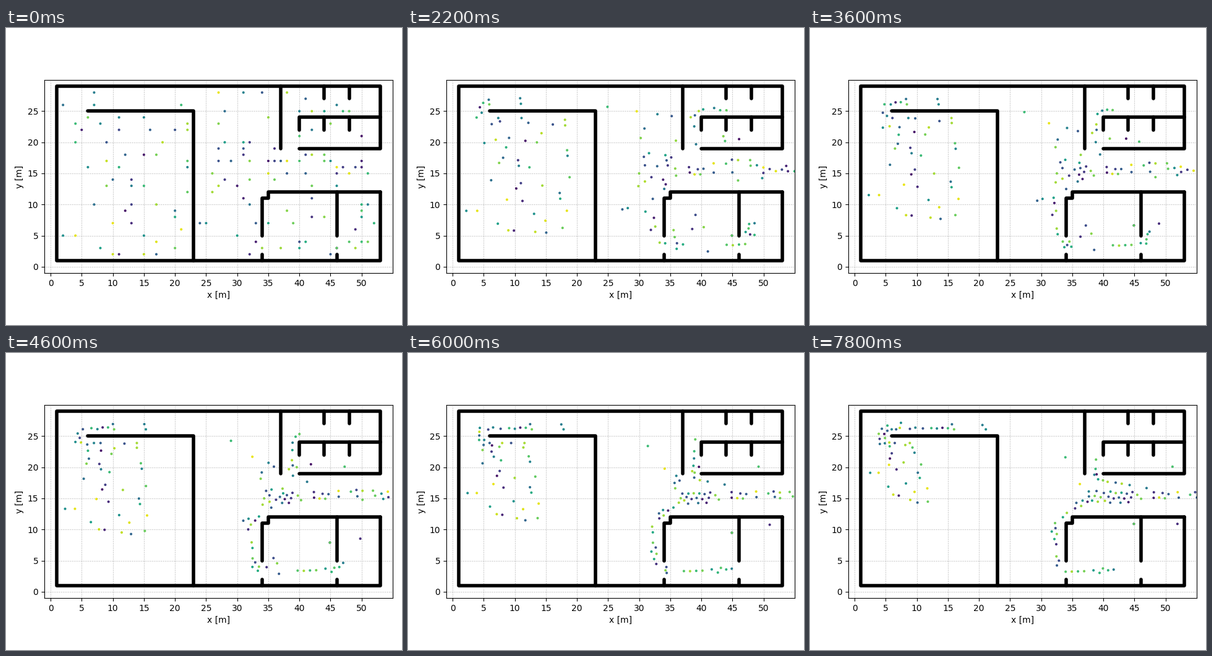
A matplotlib script that plays this animation: 640x480 px, repeating every 8000 ms.

```python
import numpy as np
import matplotlib.pyplot as plt
from matplotlib.animation import FuncAnimation

FRAMES, INTERVAL = 40, 200
PEOPLE = 138
SPEED = 0.362      # metres per frame
SPACING = 0.9      # least distance between two people
CLEARANCE = 1.1    # least distance to a wall
EXIT = (53.5, 15.5)

WALLS = [
    [(53, 12), (53, 1), (1, 1), (1, 29), (53, 29), (53, 19), (40, 19)],
    [(6, 25), (23, 25), (23, 1)],
    [(37, 29), (37, 19)],
    [(40, 22), (40, 24), (53, 24)],
    [(34, 5), (34, 11), (35, 11), (35, 12), (53, 12)],
    [(46, 12), (46, 5)],
]
WALLS += [[(x, y), (x, y - 2)] for x in (44, 48) for y in (29, 24)]
WALLS += [[(x, 1), (x, 2)] for x in (34, 46)]
SEGMENTS = [(np.array(a, float), np.array(b, float))
            for wall in WALLS for a, b in zip(wall, wall[1:])]

# Lost people: start -> first stop; from there straight towards the exit
LOST = {(46, 3): (44.9, 5), (49, 6): (47.7, 5.3), (40, 21): (44, 20.4)}
LOST_UNTIL = 12


def from_wall(pos, a, b):
    """Vectors from the nearest point of wall a-b, and their lengths."""
    ab = b - a
    t = np.clip((pos - a) @ ab / (ab @ ab), 0, 1)
    off = pos - (a + t[:, None] * ab)
    return off, np.hypot(*off.T)


def place_people(rng):
    """Random whole-metre spots at least one metre from every wall."""
    spots = np.array([(x, y) for x in range(2, 53) for y in range(2, 29)], float)
    room = np.min([from_wall(spots, a, b)[1] for a, b in SEGMENTS], axis=0)
    crowd = rng.choice(spots[room > 0.99], PEOPLE, replace=False)
    return np.vstack([crowd, list(LOST)])


def goal(x, y, from_west):
    """Next point to walk to, by room."""
    if x < 23.4:                                  # west room and its passage
        if y < 25:
            return np.clip(x, 2.7, 3.8), 25.6
        if x < 5:
            return x + 1.2, max(y, 26.8)
        return x + 5, 26.3
    if x > 46 and y < 11.9:                       # south-east room
        return 45.5, 3.5
    if x > 34.2 and y < 11.2:                     # south room
        return 33.4, 3.2
    if x > 32.8 and y < 4.5:
        return 32, 5
    if x < 37.6:                                  # middle hall
        if from_west and x < 33:
            return 36, 21.8
        if y < min(10.6, 12 - 0.476 * (31.9 - x)):
            return 31.9, 12.3
        return 38.2, 15
    if y > 24 and x > 40.1:                       # north-east room
        return 39.6, 25.2
    if y > 19 and x > 40:                         # room below it
        return max(39.2, x - 2.5), 20.4
    if y > 19.2:
        return 38.7, 18
    return EXIT if x < 52 else (x + 5, 15.5)


def aim(start, pos, step):
    stop = LOST.get(tuple(start))
    if stop:
        return stop if step < LOST_UNTIL else EXIT
    return goal(*pos, start[0] < 23)


def limit(moves):
    size = np.hypot(*moves.T)[:, None]
    return moves * np.minimum(1, SPEED / np.maximum(size, 1e-9))


def spread(pos):
    """Push people apart who stand too close."""
    diff = pos[:, None] - pos
    dist = np.hypot(diff[..., 0], diff[..., 1])
    np.fill_diagonal(dist, np.inf)
    push = 0.5 * np.maximum(0, SPACING - dist) / np.maximum(dist, 1e-6)
    return pos + (diff * push[..., None]).sum(axis=1)


def keep_off_walls(pos):
    for a, b in SEGMENTS:
        off, dist = from_wall(pos, a, b)
        scale = CLEARANCE / np.maximum(dist, 1e-6) - 1
        pos = pos + off * np.maximum(0, scale)[:, None]
    return pos


def simulate(starts):
    pos = starts
    track = [pos]
    for step in range(FRAMES - 1):
        goals = np.array([aim(s, p, step) for s, p in zip(starts, pos)])
        moved = spread(pos + limit(goals - pos))
        pos = keep_off_walls(pos + limit(moved - pos))
        track.append(pos)
    return track


rng = np.random.default_rng(12)
track = simulate(place_people(rng))
tints = rng.uniform(0.05, 0.97, len(track[0]))

fig = plt.figure(figsize=(6.4, 4.8), dpi=100)
width = 563
height = width * 31 / 56
ax = fig.add_axes([62 / 640, 0.5 - height / 960, width / 640, height / 480])
ax.set_xlim(-1, 55)
ax.set_ylim(-1, 30)
ax.set_xticks(range(0, 55, 5))
ax.set_yticks(range(0, 30, 5))
ax.set_xlabel("x [m]")
ax.set_ylabel("y [m]")
ax.grid(linestyle=":")

for wall in WALLS:
    ax.plot(*zip(*wall), color="black", lw=4,
            solid_capstyle="round", solid_joinstyle="round")
people = ax.scatter(*track[0].T, c=tints, cmap="viridis", vmin=0, vmax=1,
                    s=8.5, linewidths=0, zorder=3)


def update(i):
    people.set_offsets(track[i])
    return people,


anim = FuncAnimation(fig, update, frames=FRAMES, interval=INTERVAL,
                     repeat=True, repeat_delay=0)
plt.show()
```
